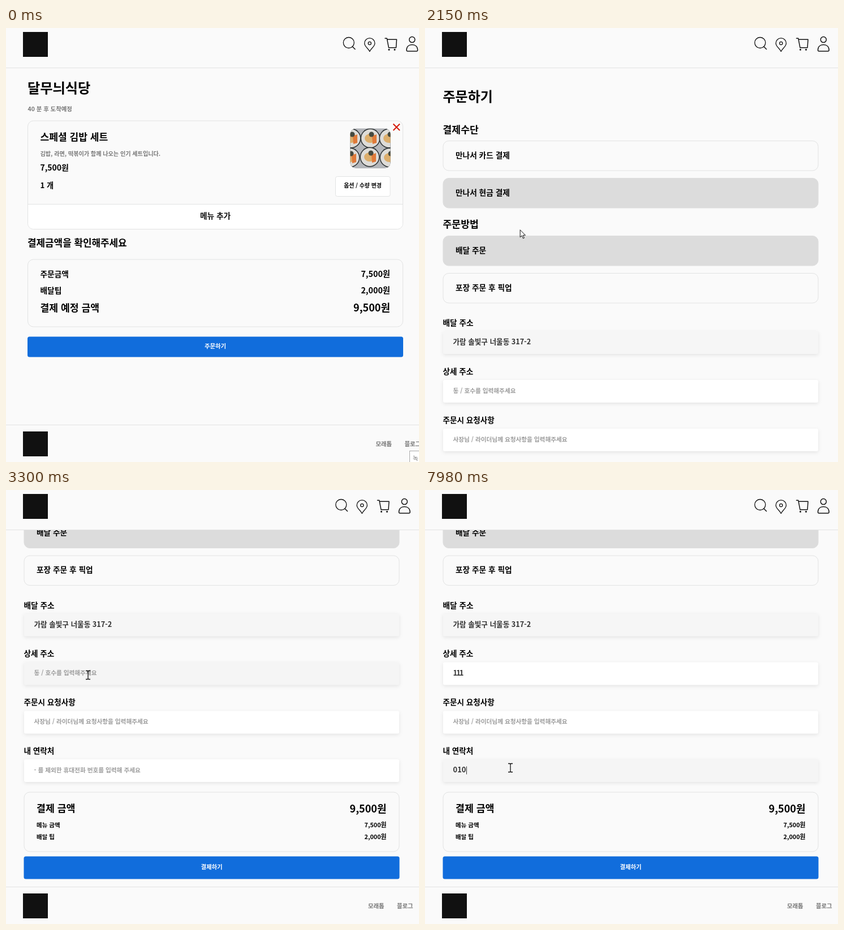
Recreate the animation shown at these times as an HTML page. Size 730 px wide and 767 px high, loop 8000 ms.

```html
<!DOCTYPE html>
<html lang="ko">
<head>
<meta charset="utf-8">
<title>주문하기</title>
<style>
html, body { margin: 0; width: 100%; height: 100%; overflow: hidden; background: #fafafa; }
svg { display: block; width: 100vw; height: 100vh; }
text { font-family: "Noto Sans CJK KR", "Noto Sans KR", "Noto Sans CJK", sans-serif; font-weight: 700; white-space: pre; }
.field { filter: drop-shadow(0 2px 3px rgba(0, 0, 0, .09)); }
.icon { fill: none; stroke: #111; stroke-width: 1.5; stroke-linejoin: round; stroke-linecap: round; }
.cursor { fill: #fff; stroke: #111; stroke-width: 1; stroke-linejoin: round; }
</style>
</head>
<body>
<svg id="stage" viewBox="0 0 730 767"></svg>
<script>
const stage = document.getElementById('stage');
const $ = id => document.getElementById(id);
const BLUE = '#116ddc', LINE = '#e2e3e3', PAGE = '#fafafa', PICKED = '#dcdcdc';

// y is the visual middle of the line of text
const text = (x, y, size, str, fill = '#000', anchor = 'start', extra = '') =>
  `<text x="${x}" y="${y + size * .37}" font-size="${size}" fill="${fill}" text-anchor="${anchor}" ${extra}>${str}</text>`;
const right = (x, y, size, str) => text(x, y, size, str, '#000', 'end');
const rect = (x, y, w, h, r, fill, extra = '') =>
  `<rect x="${x}" y="${y}" width="${w}" height="${h}" rx="${r}" fill="${fill}" ${extra}/>`;
const box = (x, y, w, h, id = '') => rect(x, y, w, h, 10, PAGE, `stroke="${LINE}" id="${id}"`);
const line = y => `<path d="M0 ${y}H730" stroke="${LINE}"/>`;
const button = (x, y, h, label) =>
  rect(x, y, 664, h, 3.5, BLUE) + text(x + 332, y + h / 2 - 1, 10.4, label, '#fff', 'middle');
const logo = y => rect(30, y, 44, 44, 0, '#111');
const footer = (y, shift) => line(y + .5) + logo(y + 12) +
  text(640 + shift, y + 34, 10.4, '모래톱', '#777') + text(691 + shift, y + 34, 10.4, '블로그', '#777');
const option = (y, label, id) => box(32, y, 663, 52.5, id) + text(54, y + 25, 13.7, label);

const roll = (x, y) => `<g transform="translate(${x} ${y})"><circle r="17.5" fill="#2b3032"/>
  <circle r="16" fill="#dedcd8"/><ellipse rx="10" ry="8" fill="#dcae6c"/>
  <path d="M3 -4l8 -3v15l-7 2z" fill="#e07a3a"/><circle cx="2" cy="-7" r="4.5" fill="#464a40"/></g>`;

const menuPage = `<g id="menu">
  ${text(38, 106, 24.2, '달무늬식당')}${text(38.5, 143, 10.4, '40 분 후 도착예정', '#777')}
  ${box(38.5, 164, 663, 191.5)}
  <path d="M39 311.5H701V345.5a9.5 9.5 0 0 1-9.5 9.5H48.5a9.5 9.5 0 0 1-9.5-9.5z" fill="#fff"/>
  <path d="M39 311.5H701" stroke="${LINE}"/>
  ${text(60.5, 193, 17.1, '스페셜 김밥 세트')}
  ${text(60.5, 222, 10.1, '김밥, 라면, 떡볶이가 함께 나오는 인기 세트입니다.', '#777')}
  ${text(60.5, 246.5, 14, '7,500원')}${text(60.5, 278.5, 13.2, '1 개')}
  <clipPath id="photo">${rect(608.5, 177.5, 71, 70.5, 10, '#000')}</clipPath>
  <g clip-path="url(#photo)">${rect(608, 177, 72, 72, 0, '#b4b6ba')}
    ${[[610, 195], [644, 195], [677, 195], [608, 229], [643, 228], [678, 229]].map(p => roll(...p)).join('')}</g>
  <path d="M684.5 169.5l11.5 11.5m0-11.5l-11.5 11.5" stroke="#d41806" stroke-width="2"/>
  ${rect(582.5, 262.5, 96.5, 35, 3, '#fff', `stroke="${LINE}"`)}
  ${text(630.5, 278.5, 9.9, '옵션 / 수량 변경', '#000', 'middle')}
  ${text(370, 332, 13.7, '메뉴 추가', '#111', 'middle')}
  ${text(38, 380, 16.9, '결제금액을 확인해주세요')}
  ${box(38.5, 409, 663, 119)}
  ${text(60.5, 435, 13.7, '주문금액')}${right(679, 435, 14.3, '7,500원')}
  ${text(60.5, 463.5, 13.7, '배달팁')}${right(679, 463.5, 14.3, '2,000원')}
  ${text(60.5, 494.5, 17.2, '결제 예정 금액')}${right(679, 494.5, 18, '9,500원')}
  ${button(38, 545.5, 36, '주문하기')}
  ${footer(701, 13.5)}
  <g id="tip">${rect(713.5, 747.5, 40, 30, 0, '#fff', 'stroke="#aaa"')}
    ${text(719, 760.5, 10.5, '녹', '#777', 'start', 'style="font-weight:400"')}</g>
</g>`;

// Editable fields: each typed digit carries the moment it appears
const fields = [
  { y: 622, label: '상세 주소', hint: '동 / 호수를 입력해주세요', focus: 3360, blur: 5090, hover: 3170,
    keys: [[4290, '1'], [4490, '1'], [4690, '1']], gap: -2 },
  { y: 708, label: '주문시 요청사항', hint: '사장님 / 라이더님께 요청사항을 입력해주세요',
    focus: 5090, blur: 7060, hover: 4920, keys: [] },
  { y: 793.5, label: '내 연락처', hint: '- 를 제외한 휴대전화 번호를 입력해 주세요',
    focus: 7060, blur: 8000, hover: 6900, keys: [[7590, '0'], [7790, '1'], [7980, '0']] }
];
const fieldMarkup = (f, i) => text(31.5, f.y - 15.5, 13.6, f.label) +
  rect(32, f.y, 663, 40, 3, '#fff', `class="field" id="bg${i}"`) +
  text(49.5, f.y + 18.8, 10.65, f.hint, '#9c9c9c', 'start', `id="hint${i}"`) +
  text(49.5, f.y + 18.5, 13, '', '#333', 'start', `id="value${i}" letter-spacing="${f.gap || 0}"`);

const orderPage = `<g id="order">
  ${text(31.5, 121, 24, '주문하기')}
  ${text(31.5, 179.5, 17.2, '결제수단')}
  ${option(199.5, '만나서 카드 결제', 'card')}${option(265.5, '만나서 현금 결제', 'cash')}
  ${text(31.5, 347, 17.2, '주문방법')}
  ${option(367.5, '배달 주문', 'deliver')}${option(433.5, '포장 주문 후 픽업', 'pickup')}
  ${text(31.5, 521, 13.7, '배달 주소')}
  ${rect(32, 536, 663, 40, 3, '#f6f6f6', 'class="field"')}
  ${text(49.5, 554.5, 12.6, '가람 솔빛구 너울동 317-2', '#333')}
  ${fields.map(fieldMarkup).join('')}
  <path id="caret" stroke="#333"/>
  ${box(32, 851.5, 663, 105)}
  ${text(54, 880.5, 17.3, '결제 금액')}${right(672.5, 880.5, 18, '9,500원')}
  ${text(54, 909.5, 10.5, '메뉴 금액')}${right(672.5, 909.5, 10.8, '7,500원')}
  ${text(54, 930.8, 10.5, '배달 팁')}${right(672.5, 930.8, 10.8, '2,000원')}
  ${button(31.5, 965, 40, '결제하기')}
  ${footer(1018.5, 0)}
</g>`;

const header = `${rect(0, 0, 730, 70, 0, PAGE)}${line(70.5)}${logo(7)}
  <g id="icons" class="icon">
    <circle cx="592.3" cy="26" r="9.5" stroke-width="1.3"/><path d="M599 33l4.5 4.5"/>
    <path d="M629.3 41.5C627 36 620.2 33 620.2 27a9.1 9.1 0 0 1 18.2 0c0 6-6.8 9-9.1 14.5z" stroke-width="1.3"/>
    <circle cx="629.3" cy="27" r="2.6" stroke-width="1.3"/>
    <path d="M656.5 18.3h3.3l3.2 16.5h13l1-14.5h-16.5"/>
    <circle cx="663.5" cy="38.3" r=".8"/><circle cx="673.5" cy="38.3" r=".8"/>
    <circle cx="704.3" cy="20.6" r="5"/>
    <path d="M696.5 41a2 2 0 0 1-2-2c0-6 4-9.5 9.8-9.5s9.8 3.5 9.8 9.5a2 2 0 0 1-2 2z"/>
  </g>`;

const pointer = `<g id="pointer">
  <circle id="press" r="11" fill="#fff03c" opacity=".75"/>
  <path id="arrow" class="cursor" d="M0 0v13l3-2.8 2.3 5 2-.9-2.3-4.8h4.3z"/>
  <path id="hand" class="cursor" d="M-1.7 2a1.6 1.6 0 0 1 3.2 0v4.500q4.500.3 6.300 1.700 1 .9.8 3.300l-1.100 4v3h-8l-1-2.500-4-5.300q-.9-2.200 1.300-1.900l2.500 2.200z"/>
  <path id="beam" d="M-4-7.5h3l1 1 1-1h3M-4 7.5h3l1-1 1 1h3M0-6.5v13" fill="none" stroke="#111" stroke-width="1.3"/>
</g>`;

stage.innerHTML = menuPage + orderPage + header + pointer;

const SWITCH = 750, PICK = 1690;
const path = [[60, 742, 772], [600, 480, 564], [830, 480, 567], [1090, 330, 440], [1370, 143, 297],
  [1680, 143, 297], [2350, 175, 373], [2780, 175, 373], [2880, 176, 370], [3010, 176, 370],
  [3300, 145, 327], [3370, 143, 324], [4690, 143, 324], [5100, 138, 401], [5310, 138, 401],
  [5490, 250, 390], [6600, 250, 390], [6780, 268, 425], [7060, 151, 488], [7180, 151, 491]];
const scrolling = [[2450, 0], [2690, 5], [2750, 13.5], [2820, 108], [2880, 203.5], [2940, 260], [3010, 298], [3110, 317.5]];
const presses = [[670, 750], [1550, 1690], [3360, 3700], [5090, 5300], [7060, 7180]];
const caretResets = [3360, 3560, 4290, 4490, 4690, 5090, 7060, 7590, 7790, 7980];

const linear = u => u;
const smooth = u => u * u * (3 - 2 * u);
function at(keys, t, ease) {
  const i = keys.findIndex(k => k[0] > t);
  if (i === 0) return keys[0].slice(1);
  if (i < 0) return keys[keys.length - 1].slice(1);
  const a = keys[i - 1], b = keys[i], u = ease((t - a[0]) / (b[0] - a[0]));
  return a.slice(1).map((v, n) => v + (b[n + 1] - v) * u);
}
const show = (id, on) => $(id).setAttribute('visibility', on ? 'visible' : 'hidden');
const set = (id, name, value) => $(id).setAttribute(name, value);
const fillOption = (id, on) => {
  set(id, 'fill', on ? PICKED : PAGE);
  set(id, 'stroke', on ? PICKED : LINE);
};

function cursorKind(x, y, t, scroll) {
  if (t < SWITCH) return y > 546 && y < 581 && x < 702 ? 'hand' : 'arrow';
  const inside = (top, h) => y + scroll > top && y + scroll < top + h;
  if ([199.5, 265.5, 367.5, 433.5].some(top => inside(top, 52.5))) return 'hand';
  return [536, ...fields.map(f => f.y)].some(top => inside(top, 40)) ? 'beam' : 'arrow';
}

function drawFields(t) {
  let caret = '';
  fields.forEach((f, i) => {
    const value = f.keys.filter(k => t >= k[0]).map(k => k[1]).join('');
    const focused = t >= f.focus && t < f.blur;
    $('value' + i).textContent = value;
    set('hint' + i, 'visibility', value ? 'hidden' : 'inherit');
    set('hint' + i, 'opacity', focused ? 1 - .5 * Math.min(1, (t - f.focus) / 200) : 1);
    set('bg' + i, 'fill', t >= f.hover && t < f.blur ? '#f5f5f5' : '#fff');
    if (!focused) return;
    const since = t - Math.max(...caretResets.filter(r => r <= t));
    if (since % 1060 < 530) {
      const x = value ? 49.5 + $('value' + i).getComputedTextLength() : 49;
      caret = `M${Math.round(x) + .5} ${f.y + 12.5}v14`;
    }
  });
  set('caret', 'd', caret);
}

function draw(t) {
  const ordering = t >= SWITCH;
  $('menu').style.display = ordering ? 'none' : '';
  $('order').style.display = ordering ? '' : 'none';
  set('icons', 'transform', `translate(${ordering ? 0 : 13.5} 0)`);
  show('tip', t < 140);

  const [scroll] = at(scrolling, t, linear);
  set('order', 'transform', `translate(0 ${-scroll})`);
  fillOption('card', t < PICK);
  fillOption('cash', t >= PICK);
  fillOption('deliver', true);
  if (ordering) drawFields(t);

  const [x, y] = at(path, t, smooth), kind = cursorKind(x, y, t, scroll);
  set('pointer', 'transform', `translate(${x} ${y})`);
  ['arrow', 'hand', 'beam'].forEach(k => show(k, k === kind));
  show('press', presses.some(([from, to]) => t >= from && t < to));
}

let start;
function tick(now) {
  start ??= now;
  draw((now - start) % 8000);
  requestAnimationFrame(tick);
}
draw(0);
requestAnimationFrame(tick);
</script>
</body>
</html>
```
